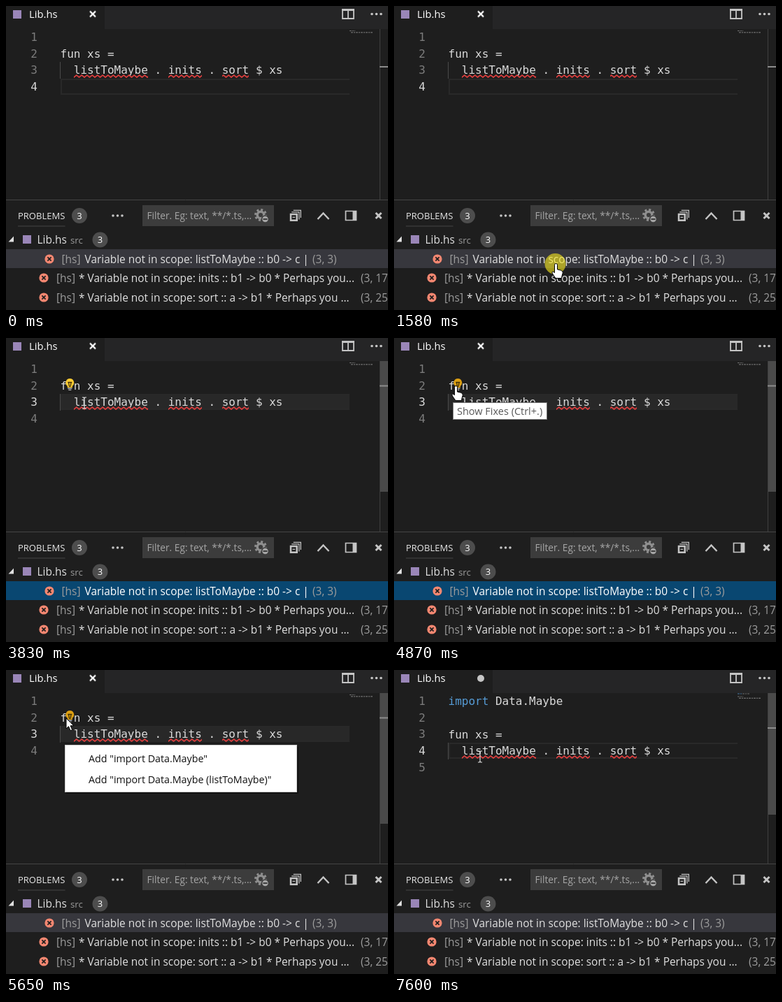
An HTML page that plays this animation: 546x435 px, repeating every 8 s.

```html
<!DOCTYPE html>
<html lang="en">
<head>
<meta charset="utf-8">
<title>Add an import from the problems panel</title>
<style>
html, body { margin: 0; width: 100%; height: 100%; overflow: hidden; background: #1e1e1e; }
svg { display: block; width: 546px; height: 435px; }
text { font: 15.45px "Open Sans", "Noto Sans", sans-serif; fill: #e0e0e0; white-space: pre; }
.code text { font: 16px "DejaVu Sans Mono", monospace; fill: #dadada; }
.code .nums text { fill: #7c7c7c; text-anchor: middle; }
text.dim { fill: #9c9c9c; }
.small { font-size: 13.3px; }
.badge text { font-size: 13px; text-anchor: middle; fill: #fff; }
.menu text { font-size: 14.25px; fill: #111; }
.line { fill: none; stroke: #c5c5c5; }

/* One 8 s timeline: 1% is 80 ms */
.a { animation: 8s step-end infinite; }
.row { animation-name: row; }
.rowText { animation-name: rowText; }
.num3 { animation-name: num3; }
.num4 { animation-name: num4; }
.before { animation-name: before; }
.after { animation-name: after; }
.body { animation-name: body; }
.current { animation-name: current; }
.range { animation-name: range; }
.mark { animation-name: mark; }
.slider { animation-name: slider; }
.bulb { animation-name: bulb; }
.glow { animation-name: glow; }
.caret { animation-name: caret; }
.tip { animation-name: tip; }
.menu { animation-name: menu; }
.item { animation-name: item; }
.pointer { animation-name: pointer; }
.click { animation-name: click; }
.hand { animation-name: hand; }
.arrow { animation-name: arrow; }
.beam { animation-name: beam; }

@keyframes row { 0%, 63.75% { fill: #37373d } 20.75% { fill: #094771 } }
@keyframes rowText { 0%, 63.75% { fill: #e0e0e0 } 20.75% { fill: #fff } }
@keyframes num3 { 0%, 89% { fill: #7c7c7c } 20.75% { fill: #d8d8d8 } }
@keyframes num4 { 0%, 89% { fill: #d8d8d8 } 20.75% { fill: #7c7c7c } }
@keyframes before { 0% { opacity: 1 } 89%, 100% { opacity: 0 } }
@keyframes after { 0% { opacity: 0 } 89%, 100% { opacity: 1 } }
@keyframes body { 0% { transform: none } 89%, 100% { transform: translateY(24px) } }
@keyframes current { 0%, 89% { transform: translateY(24px) } 20.75% { transform: none } }
@keyframes range { 0%, 89% { opacity: 0 } 20.75% { opacity: 1 } }
@keyframes mark { 0% { transform: translateY(87px) } 20.75% { transform: translateY(68.5px) } 89%, 100% { transform: translateY(83px) } }
@keyframes slider { 0% { opacity: 0; height: 187px } 45% { opacity: .5; height: 187px } 46% { opacity: 1; height: 187px } 89%, 100% { opacity: 1; height: 174px } }
@keyframes bulb { 0%, 89% { opacity: 0 } 35.25% { opacity: 1 } }
@keyframes glow { 0%, 77.3% { fill: #fc3 } 54.9% { fill: #dda013 } }
@keyframes caret { 0%, 70.625%, 95% { opacity: 0 } 65.625%, 89% { opacity: 1 } }
@keyframes tip { 0%, 63.75% { opacity: 0 } 58.875% { opacity: .35 } 59.875% { opacity: .7 } 60.875% { opacity: 1 } }
@keyframes menu { 0%, 88% { opacity: 0 } 64.625% { opacity: 1 } }
@keyframes item { 0% { opacity: 0 } 82.2%, 100% { opacity: 1 } }
@keyframes click { 0%, 21.625%, 64.625%, 88% { opacity: 0 } 19.75%, 62.75%, 87.25% { opacity: 1 } }
@keyframes hand { 0%, 44% { opacity: 0 } 5.375%, 54.9% { opacity: 1 } 64.625% { opacity: 0 } }
@keyframes arrow { 0%, 45% { opacity: 0 } 44%, 64.625% { opacity: 1 } 89% { opacity: 0 } }
@keyframes beam { 0%, 54.9% { opacity: 0 } 45%, 89%, 100% { opacity: 1 } }
@keyframes pointer {
  0% { transform: translate(485px, 432px) }
  5.375% { transform: translate(485px, 432px); animation-timing-function: steps(6, start) }
  11% { transform: translate(262px, 384px); animation-timing-function: steps(5, start) }
  15.6875% { transform: translate(231px, 369px) }
  42.125% { transform: translate(231px, 369px); animation-timing-function: steps(3, start) }
  45% { transform: translate(150px, 190px); animation-timing-function: steps(3, start) }
  47.8% { transform: translate(103px, 92px) }
  47.875% { transform: translate(112px, 93px) }
  48.875% { transform: translate(110px, 94px) }
  49.75% { transform: translate(112px, 93px) }
  51.875% { transform: translate(112px, 93px); animation-timing-function: steps(6, start) }
  57.875% { transform: translate(88px, 69px) }
  64.625% { transform: translate(86px, 69px) }
  75.375% { transform: translate(86px, 69px); animation-timing-function: steps(10, start) }
  85.1% { transform: translate(121px, 122px) }
  89%, 100% { transform: translate(123px, 124px) }
}
</style>
</head>
<body>
<svg viewBox="0 0 546 435">
  <defs>
    <pattern id="wave" width="7.5" height="5" y="98" x="97" patternUnits="userSpaceOnUse">
      <path d="M-1 3.4L0 4 3.75 1 7.5 4 8.5 3.4" fill="none" stroke="#f04040" stroke-width="1.5"/>
    </pattern>
    <g id="dots" fill="#c5c5c5"><circle cx="-6.5" r="1.8"/><circle r="1.8"/><circle cx="6.5" r="1.8"/></g>
    <path id="cross" d="M-4-4L4 4M4-4L-4 4"/>
    <g id="error">
      <circle r="6.6" fill="#f48771"/>
      <path d="M-2.6-2.6L2.6 2.6M2.6-2.6L-2.6 2.6" stroke="#1e1e1e" stroke-width="1.7"/>
    </g>
  </defs>

  <rect width="546" height="435" fill="#1e1e1e"/>

  <!-- Tab bar -->
  <rect x="141" width="405" height="33" fill="#252526"/>
  <rect x="10" y="6" width="12" height="12" fill="#9a86b8"/>
  <text x="33" y="17" style="font-size:14.8px;fill:#fff">Lib.hs</text>
  <use href="#cross" class="a before" x="124" y="11.5" stroke="#fff" stroke-width="2.4"/>
  <circle class="a after" cx="124" cy="12" r="5" fill="#c5c5c5"/>
  <path class="line" d="M481 5.5H497V18H481ZM489 5V18" stroke-width="1.8"/>
  <path d="M480 4h18v3h-18z" fill="#c5c5c5"/>
  <use href="#dots" x="529.5" y="11.5"/>

  <!-- Editor -->
  <g class="a current">
    <rect class="a range" x="78" y="80" width="413" height="23" fill="#fff" fill-opacity=".045"/>
    <path d="M491 81H79V102H491" fill="none" stroke="#292929" stroke-width="2"/>
  </g>
  <g class="code">
    <g class="nums">
      <text x="40" y="50">1</text>
      <text x="40" y="74">2</text>
      <text x="40" y="97" class="a num3">3</text>
      <text x="40" y="121" class="a num4">4</text>
      <text x="40" y="145" class="a after">5</text>
    </g>
    <text x="77.5" y="50" class="a after"><tspan fill="#569cd6">import</tspan> Data.Maybe</text>
    <g class="a body">
      <path d="M77.5 80V104" stroke="#4a4a4a"/>
      <text x="77.5" y="74">fun xs =</text>
      <text x="96.8" y="97">listToMaybe . inits . sort $ xs</text>
      <path d="M97 98h106v5H97zM232 98h48v5h-48zM309 98h38v5h-38z" fill="url(#wave)"/>
      <rect class="a caret" x="96" y="80" width="2" height="24" fill="#aeafad"/>
    </g>
  </g>

  <!-- Minimap and scroll bar -->
  <g stroke="#8a8a8a" stroke-width="1.2" stroke-dasharray="3 1 2 1" opacity=".75">
    <path class="a before" d="M491 35.5h8M493 37.8h31"/>
    <g class="a after">
      <path d="M491 34h6" stroke="#569cd6"/>
      <path d="M498 34h11M491 38h8M493 40.3h31"/>
    </g>
  </g>
  <rect class="a slider" x="534" y="33" width="12" height="187" fill="#4a4a4a"/>
  <path d="M534.5 33V277" stroke="#404040"/>
  <rect class="a mark" x="534" y="-1" width="12" height="2" fill="#8c8c8c"/>

  <!-- Panel header -->
  <path d="M0 277.5H546M17 315H84.5" stroke="#444"/>
  <text x="17" y="305" style="font-size:13px;fill:#e7e7e7">PROBLEMS</text>
  <g class="badge">
    <circle cx="105" cy="300" r="11" fill="#4d4d4d"/><text x="105" y="304.5">3</text>
    <circle cx="134.5" cy="334.5" r="11" fill="#4d4d4d"/><text x="134.5" y="339">3</text>
  </g>
  <use href="#dots" x="159.5" y="300"/>
  <rect x="195" y="285" width="188" height="30" fill="#3c3c3c"/>
  <text x="201.5" y="305" style="font-size:13.7px;fill:#a6a6a6">Filter. Eg: text, **/*.ts,...</text>
  <g fill="none" stroke="#8f8f8f">
    <circle cx="364" cy="299" r="7.5" stroke-width="3" stroke-dasharray="2.945"/>
    <circle cx="364" cy="299" r="4.8" stroke-width="3.4"/>
    <circle cx="370.5" cy="305" r="5" fill="#a5a5a5" stroke="#3c3c3c" stroke-width="1.5"/>
    <path d="M367.5 305h6" stroke="#333" stroke-width="1.8"/>
  </g>
  <path d="M14 1v9h-1V2H5V1zM3 3v1h8v8h1V3zM10 5v9H1V5zM8 7H3v5h5zM4 9h3v1H4z" fill="#c5c5c5" fill-rule="evenodd" transform="translate(404.5 290.5) scale(1.25)"/>
  <g class="line">
    <path d="M445.5 305L453.5 296.5 461.5 305" stroke-width="2.4"/>
    <path d="M485.5 293.5H500.5V306.5H485.5Z" stroke-width="1.7"/>
    <path d="M498 293V307" stroke-width="5"/>
    <use href="#cross" x="532.5" y="300" stroke-width="3"/>
  </g>

  <!-- Problem list -->
  <path d="M11 329.5V337.5H3.5Z" fill="#e0e0e0"/>
  <rect x="24" y="328" width="12" height="12" fill="#9a86b8"/>
  <text x="44.5" y="340">Lib.hs</text>
  <text x="92" y="340" class="dim small">src</text>

  <rect class="a row" y="348" width="546" height="27"/>
  <use href="#error" x="62" y="362"/>
  <text x="79.5" y="368" class="dim">[hs]</text>
  <text x="112.5" y="368" class="a rowText">Variable not in scope: listToMaybe :: b0 -> c |</text>
  <text x="438" y="368" class="dim">(3, 3)</text>

  <use href="#error" x="54" y="389"/>
  <text x="72" y="395" class="dim">[hs]</text>
  <text x="104" y="395">* Variable not in scope: inits :: b1 -> b0 * Perhaps you...</text>
  <text x="507" y="395" class="dim">(3, 17)</text>

  <use href="#error" x="54" y="417"/>
  <text x="72" y="423" class="dim">[hs]</text>
  <text x="104" y="423">* Variable not in scope: sort :: a -> b1 * Perhaps you ...</text>
  <text x="507" y="423" class="dim">(3, 25)</text>

  <!-- Light bulb, tooltip, menu -->
  <g class="a bulb">
    <rect x="87" y="60" width="10.5" height="16" fill="#1e1e1e"/>
    <path class="a glow" d="M91.3 58a6 6 0 0 1 3.5 10.8V71H87.8V68.8A6 6 0 0 1 91.3 58Z"/>
    <path d="M88.3 63.5H94.3M89.6 64L90.6 70M93 64L92 70" fill="none" stroke="#3a2c08" stroke-width="1.3"/>
    <path d="M88.3 72.2H94.3M89.3 74.4H93.3" stroke="#b5b5b5" stroke-width="1.4"/>
  </g>
  <g class="a tip">
    <rect x="84.5" y="92.5" width="134" height="24" fill="#fff" stroke="#767676"/>
    <text x="90" y="110" style="font-size:14.5px;fill:#575757">Show Fixes (Ctrl+.)</text>
  </g>
  <g class="a menu">
    <rect x="86" y="110" width="332" height="67" fill="#000" opacity=".35"/>
    <rect x="84.5" y="107.5" width="331" height="67" fill="#fff" stroke="#ccc"/>
    <rect class="a item" x="85" y="112" width="330" height="30" fill="#e9e9e9"/>
    <text x="118" y="132">Add "import Data.Maybe"</text>
    <text x="118" y="162">Add "import Data.Maybe (listToMaybe)"</text>
  </g>

  <!-- Mouse pointer -->
  <g class="a pointer" stroke-linejoin="round">
    <circle class="a click" cx="-.5" r="15" fill="#faeb1e" fill-opacity=".6"/>
    <path class="a hand" d="M-1.5 1.5a2 2 0 0 1 4 0V8l5 1.2q2.8.8 2.8 3.6L9.1 17 8.5 20.5H0L-4.5 14q-1.4-2.6.4-3.2L-1.5 12.6Z" fill="#fff" stroke="#000"/>
    <path class="a arrow" d="M0 0V15L3.5 11.7 6.1 17.7 8.7 16.6 6.1 10.8H11Z" fill="#fff" stroke="#000"/>
    <path class="a beam" d="M-3-8H-1L0-7 1-8H3M0-7V7M-3 8H-1L0 7 1 8H3" fill="none" stroke="#ddd" stroke-width="1.2"/>
  </g>
</svg>
</body>
</html>
```
